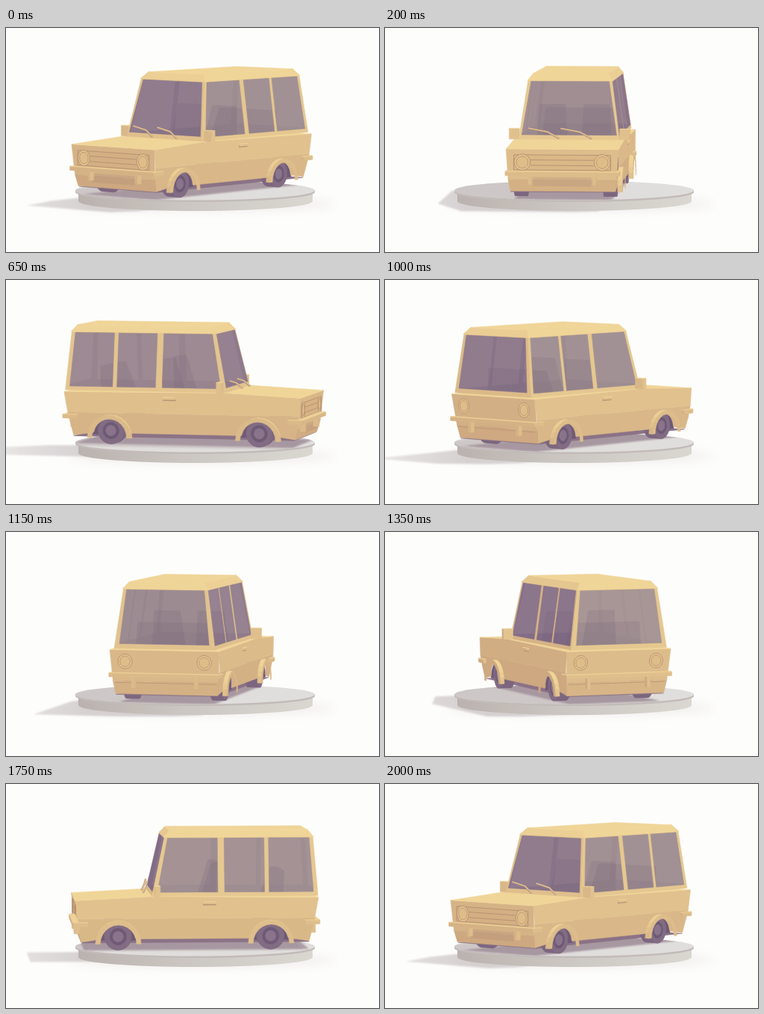
Animation of 500x300 px, one loop 2.05 s. Source, as an HTML page:

```html
<!DOCTYPE html>
<html lang="en">
<head>
<meta charset="utf-8">
<title>Turntable car</title>
<style>
html, body { margin: 0; width: 100%; height: 100%; overflow: hidden; background: #fdfdfb; }
svg { display: block; width: 100%; height: 100%; }
</style>
</head>
<body>
<svg viewBox="0 0 500 300">
  <defs>
    <linearGradient id="rim"><stop offset="0" stop-color="#bab2ae"/><stop offset=".45" stop-color="#cbc6c1"/><stop offset="1" stop-color="#dad7d1"/></linearGradient>
    <linearGradient id="cast" gradientUnits="userSpaceOnUse" x1="0" x2="110" y1="0" y2="0"><stop offset="0" stop-color="#e7e4e4"/><stop offset="1" stop-color="#d6d0d1"/></linearGradient>
    <filter id="soft" x="-20%" y="-60%" width="140%" height="220%"><feGaussianBlur stdDeviation="7"/></filter>
    <filter id="edge"><feGaussianBlur stdDeviation=".8"/></filter>
    <clipPath id="top"><ellipse cx="253.5" cy="217.5" rx="160.5" ry="13"/></clipPath>
  </defs>
  <ellipse cx="262" cy="236" rx="180" ry="8" fill="#eeebea" filter="url(#soft)"/>
  <g id="ground"></g>
  <path d="M97 222V232A156.5 13 0 0 0 411 232V222Z" fill="url(#rim)"/>
  <path d="M93 217.5V220A160.5 13 0 0 0 414 220V217.5Z" fill="#c2bbb9"/>
  <ellipse cx="253.5" cy="217.5" rx="160.5" ry="13" fill="#e0dedc"/>
  <g id="car"></g>
</svg>
<script>
// Car space: x forward, y to the car's left, z up.
const TILT = 0.075, EYE = 4500, FRAME = 50, FRAMES = 41, STEP = 9, START = 49;
const DARK = '#6f5a76', TYRE = '#7c667f', LINE = '#b58f72';
const AXLES = [105, -97], WIDE = 73;
const ground = document.getElementById('ground'), car = document.getElementById('car');
let sin, cos, out;

function project([x, y, z]) {
  const near = sin * x + cos * y, k = 1 + near / EYE;
  return [252 + k * (sin * y - cos * x), 150 + k * (66 + TILT * near - z)];
}
const text = pts => pts.map(p => p.map(v => v.toFixed(2)).join()).join(' ');
const flat = (pts, fill, extra = '') => { out += `<polygon points="${text(pts)}" fill="${fill}" ${extra}/>`; };
const poly = (pts, fill, extra) => flat(pts.map(project), fill, extra || `stroke="${fill}" stroke-width=".5"`);
const line = (pts, color, width) => {
  out += `<polyline points="${text(pts.map(project))}" fill="none" stroke="${color}" stroke-width="${width}" stroke-linejoin="round"/>`;
};

function hull(pts) {
  const sorted = [...pts].sort((a, b) => a[0] - b[0] || a[1] - b[1]);
  const half = list => {
    const h = [];
    for (const p of list) {
      while (h.length > 1) {
        const [a, b] = h.slice(-2);
        if ((b[0] - a[0]) * (p[1] - a[1]) - (b[1] - a[1]) * (p[0] - a[0]) > 0) break;
        h.pop();
      }
      h.push(p);
    }
    return h.slice(0, -1);
  };
  return [...half(sorted), ...half(sorted.reverse())];
}

const mix = (a, b, t) => `rgb(${a.map((v, i) => Math.round(v + (b[i] - v) * Math.min(1, Math.max(0, t))))})`;
const mean = pts => [0, 1, 2].map(i => pts.reduce((sum, p) => sum + p[i], 0) / pts.length);
const sub = (a, b) => a.map((v, i) => v - b[i]);

// Unit normal pointing away from an inner point, plus how the face meets eye and light.
function facing(pts, inside) {
  const a = sub(pts[1], pts[0]), b = sub(pts[2], pts[1]);
  const n = [a[1] * b[2] - a[2] * b[1], a[2] * b[0] - a[0] * b[2], a[0] * b[1] - a[1] * b[0]];
  const away = sub(mean(pts), inside);
  const size = Math.hypot(...n) * Math.sign(n[0] * away[0] + n[1] * away[1] + n[2] * away[2]);
  const [nx, ny, up] = n.map(v => v / size);
  const right = sin * ny - cos * nx, near = sin * nx + cos * ny;
  return { up, visible: near + TILT * up > 0, lit: Math.max(0, 0.4 * right + 0.9 * near) };
}

function face(pts, inside = [0, 0, 45]) {
  const { up, visible, lit } = facing(pts, inside);
  if (!visible) return;
  const low = mean(pts)[2] < 42 ? 0.1 : 0;
  poly(pts, mix([205, 168, 128], [240, 213, 152], 0.12 + 0.5 * lit + 0.88 * up - low));
}

function solid(low, high) {
  const middle = mean([...low, ...high]);
  low.forEach((p, i) => {
    const j = (i + 1) % 4;
    face([p, low[j], high[j], high[i]], middle);
  });
  face(high, middle);
}
const rect = (x0, x1, y0, y1, z) => [[x0, y0, z], [x1, y0, z], [x1, y1, z], [x0, y1, z]];
const box = (x0, x1, y0, y1, z0, z1) => solid(rect(x0, x1, y0, y1, z0), rect(x0, x1, y0, y1, z1));
const span = (sign, a, b) => sign > 0 ? [a, b] : [-b, -a];
const circle = (r, place) => Array.from({ length: 28 }, (_, i) => {
  const a = i * Math.PI / 14;
  return place(r * Math.cos(a), r * Math.sin(a));
});

const wheelRing = (x, y, r) => circle(r, (u, v) => [x + u, y, 18 + v]);
const tyre = (x, side) => flat(hull([...wheelRing(x, side * 50, 18), ...wheelRing(x, side * 67, 18)].map(project)), TYRE);
const arch = (x, w, h) => Array.from({ length: 13 }, (_, i) => {
  const a = i * Math.PI / 12;
  return [x + w * Math.cos(a), 9 + h * Math.sin(a)];
});

function wheel(x, side) {
  poly(arch(x, 24, 27).map(([u, z]) => [u, side * 69, Math.max(13, z)]), DARK);
  tyre(x, side);
  poly(wheelRing(x, side * 67, 17.5), '#826c84');
  poly(wheelRing(x, side * 67, 11), DARK);
  poly(wheelRing(x, side * 67, 7), '#8a748b');
}

function flare(x, side) {
  const outer = arch(x, 30, 30), inner = arch(x, 24, 25);
  const at = (y, [u, z]) => [u, side * y, z];
  outer.slice(1).forEach((b, i) => {
    const a = outer[i];
    face([at(70, a), at(70, b), at(76, b), at(76, a)], [x, side * 73, 9]);
    face([at(76, a), at(76, b), at(76, inner[i + 1]), at(76, inner[i])]);
  });
}

const BUMPER = { 1: [157, 32], '-1': [154, 34] };

function bumper(end) {
  const [x, z] = BUMPER[end];
  for (const y of [-42, 42]) box(...span(end, x - 2, x + 5), y - 2, y + 2, 20, z);
  box(...span(end, x, x + 8), -WIDE, WIDE, z, z + 5);
}

function bumperWrap(end, side) {
  const [x, z] = BUMPER[end];
  box(...span(end, x - 12, x + 7), ...span(side, 70, 74), z, z + 5);
}

function lamp(x, y, z, r) {
  const ring = k => circle(k, (u, v) => [x, y + u, z + v]);
  poly(ring(r), '#e2c28c', `stroke="${LINE}" stroke-width=".9"`);
  poly(ring(r * 0.72), '#dfbd89', `stroke="${LINE}" stroke-width=".8"`);
}

function frontDetails() {
  const x = 161, panel = (w, z0, z1) => [[x, -w, z0], [x, w, z0], [x, w, z1], [x, -w, z1]];
  poly(panel(63, 39, 58.5), '#c79d70', `fill-opacity=".15" stroke="${LINE}" stroke-width=".9"`);
  for (const z of [45, 52]) line([[x, -41, z], [x, 41, z]], LINE, 0.9);
  for (const y of [-52, 52]) lamp(x, y, 49, 10.5);
  poly(panel(38, 18, 30), '#a98377', 'fill-opacity=".25"');
}

function rearDetails() {
  for (const y of [-53, 53]) lamp(-158, y, 54, 9.5);
  line([[-153, -68, 26], [-153, 68, 26]], LINE, 0.7);
}

function body(side) {
  const wall = z => WIDE - Math.max(0, 42 - z) * 0.15;
  const onSide = ([x, z]) => [x, side * wall(z), z];
  const strip = (x0, z0, x1, z1) => face([[x0, wall(z0), z0], [x0, -wall(z0), z0], [x1, -wall(z1), z1], [x1, wall(z1), z1]]);
  AXLES.forEach(x => wheel(x, side));
  const openings = AXLES.flatMap(x => arch(x, 24, 25).map(([u, z]) => [u, Math.max(15, z)]));
  face([[159.6, 42], [158, 26], [154, 11], [140, 13], ...openings, [-136, 13], [-148, 11], [-152, 28], [-155, 42]].map(onSide));
  face([[159.6, 42], [162, 66], [60, 71], [-160, 69], [-155, 42]].map(onSide));
  strip(162, 66, 158, 26);
  strip(158, 26, 154, 11);
  strip(-160, 69, -152, 28);
  strip(-152, 28, -148, 11);
  strip(162, 66, 60, 71);
  strip(60, 71, -160, 69);
  AXLES.forEach(x => flare(x, side));
  const handle = [-24, -7, ...span(side, 73, 75)];
  poly([[-24, side * 73.2, 59.5], [-7, side * 73.2, 59.5], [-7, side * 73.2, 61.5], [-24, side * 73.2, 61.5]], LINE);
  box(...handle, 61, 64);
}

// Every pane is a quad lying on the cabin.
const lean = z => 67 - (z - 72) * 11 / 77;
const pane = (side, a, b, c, d) =>
  [[a, 76], [b, 76], [c, 147], [d, 147]].map(([x, z]) => [x, side * lean(z), z]);
const flank = side => [pane(side, 53, -27, -27, 39), pane(side, -36, -89, -89, -36), pane(side, -95, -154, -149, -95)];
const across = (x0, x1, w0, w1) => [[x0, -w0, 77], [x0, w0, 77], [x1, w1, 147], [x1, -w1, 147]];
const LEFT = flank(1), RIGHT = flank(-1);
const FRONT = [across(59.5, 43.8, 63, 52)], REAR = [across(-160, -154, 60, 52)];

function seats() {
  for (const [x, y, w, z] of [[-20, 30, 20, 112], [-20, -30, 20, 112], [-105, 0, 50, 102]]) {
    const corners = [...rect(x - 10, x + 12, y - w, y + w, 65), ...rect(x - 12, x - 2, y - w + 3, y + w - 3, z)];
    flat(hull(corners.map(project)), '#6d5874', 'fill-opacity=".17"');
  }
}

function glass() {
  const shown = [...(cos > 0 ? LEFT : RIGHT), ...(sin > 0 ? FRONT : REAR)];
  const behind = [...(cos > 0 ? RIGHT : LEFT), ...(sin > 0 ? REAR : FRONT)];
  out += `<clipPath id="glass">${shown.map(q => `<polygon points="${text(q.map(project))}"/>`).join('')}</clipPath>`;
  shown.forEach(q => poly(q, mix([130, 108, 134], [165, 149, 147], facing(q, [-50, 0, 100]).lit ** 2)));
  out += '<g clip-path="url(#glass)">';
  behind.forEach(q => poly(q, '#b9a7a6', 'fill-opacity=".16"'));
  seats();
  out += '</g>';
}

function wipers() {
  for (const y of [-12, 31]) {
    line([[70, y, 73], [65, y - 16, 81], [62, y - 42, 85.5]], '#a98a80', 2.4);
    line([[70, y, 73.5], [65, y - 16, 81.5], [62, y - 42, 86]], '#e3c48f', 1.4);
  }
}

const mirror = side => box(50, 57, ...span(side, 67, 80), 71, 85);

function shadow(floor, lift, fill, extra) {
  const points = [
    ...rect(-152, 158, -70, 70, 16), ...rect(-160, 60, -WIDE, WIDE, 70), ...rect(162, 162, -WIDE, WIDE, 66), ...rect(-154, 43, -56, 56, 150)
  ].map(([x, y, z]) => {
    const [px, py] = project([x, y, 0]), h = z + lift;
    return [px - 0.73 * h, py - 216 + floor + TILT * 0.15 * h];
  });
  flat(hull(points), fill, extra);
}

function draw(time) {
  const angle = (START + STEP * (Math.floor(time / FRAME) % FRAMES)) * Math.PI / 180;
  sin = Math.sin(angle);
  cos = Math.cos(angle);
  const side = Math.sign(cos), end = Math.sign(sin);

  out = '';
  shadow(230, 16, 'url(#cast)', 'filter="url(#edge)"');
  ground.innerHTML = out;

  out = '<g clip-path="url(#top)">';
  shadow(216, 0, '#c6bebf', 'fill-opacity=".7" filter="url(#edge)"');
  poly(rect(-148, 150, -64, 64, 0), '#96828f', 'fill-opacity=".7" filter="url(#edge)"');
  out += '</g>';

  AXLES.forEach(x => tyre(x, -side));
  poly(rect(-148, 153, -68, 68, 10), '#8b7286');
  bumper(-end);
  bumperWrap(-end, -side);
  bumperWrap(end, -side);
  body(side);
  if (end > 0) frontDetails(); else rearDetails();
  bumper(end);
  bumperWrap(end, side);
  bumperWrap(-end, side);
  mirror(-side);
  if (end < 0) wipers();
  solid(rect(-160, 60, -67, 67, 71), rect(-154, 43, -56, 56, 149));
  glass();
  solid(rect(-155, 44, -57, 57, 148), rect(-148, 36, -50, 50, 157));
  if (end > 0) wipers();
  mirror(side);
  car.innerHTML = out;
}

const begin = performance.now();
function tick() {
  draw(performance.now() - begin);
  requestAnimationFrame(tick);
}
tick();
</script>
</body>
</html>
```
